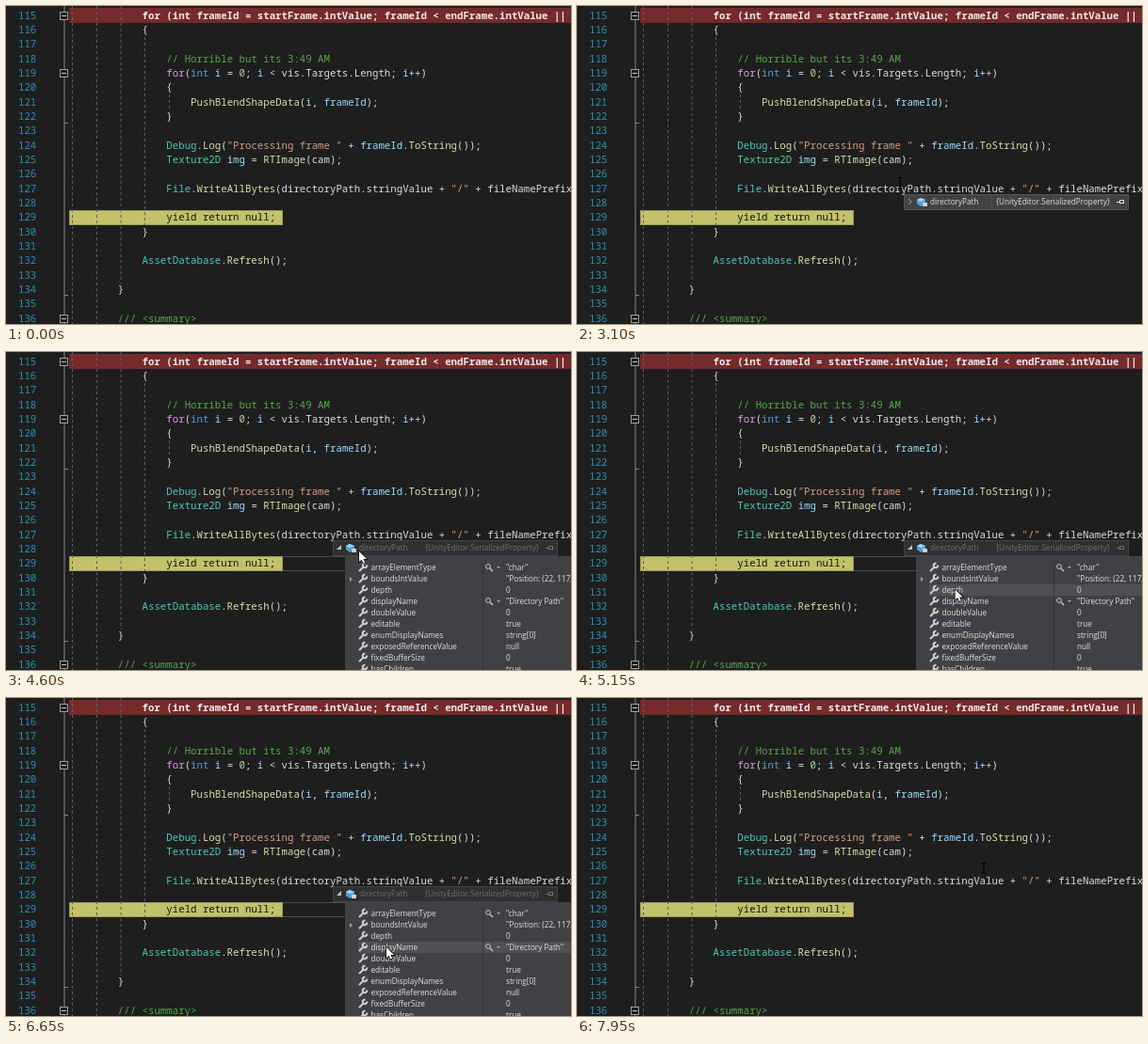
These frames come from a looping animation (600 px wide and 338 px high, 8000 ms). An HTML page with a canvas:

```html
<!DOCTYPE html>
<html lang="en">
<head>
<meta charset="utf-8">
<title>Debugger data tip</title>
<style>
html, body { margin: 0; width: 100%; height: 100%; overflow: hidden; background: #1e1e1e; }
canvas { display: block; width: 600px; height: 338px; }
</style>
</head>
<body>
<canvas id="stage" width="600" height="338"></canvas>
<script>
const ctx = document.getElementById('stage').getContext('2d');
const LOOP = 8000, PITCH = 15.33, FIRST = 115;
const CODE_FONT = '500 10.73px "Noto Sans Mono", monospace';
const BOLD_FONT = CODE_FONT.replace('500', '600');
const TIP_FONT = '8.2px "Open Sans", sans-serif';

// Each entry: line number, indent in columns, text
const code = [
  [115, 12, 'for (int frameId = startFrame.intValue; frameId < endFrame.intValue || '],
  [116, 12, '{'],
  [118, 16, '// Horrible but its 3:49 AM'],
  [119, 16, 'for(int i = 0; i < vis.Targets.Length; i++)'],
  [120, 16, '{'],
  [121, 20, 'PushBlendShapeData(i, frameId);'],
  [122, 16, '}'],
  [124, 16, 'Debug.Log("Processing frame " + frameId.ToString());'],
  [125, 16, 'Texture2D img = RTImage(cam);'],
  [127, 16, 'File.WriteAllBytes(directoryPath.stringValue + "/" + fileNamePrefix'],
  [129, 16, 'yield return null;'],
  [130, 12, '}'],
  [132, 12, 'AssetDatabase.Refresh();'],
  [134, 8, '}'],
  [136, 8, '/// <summary>']
];
const lineStyle = {
  115: { color: '#f2eaea', font: BOLD_FONT },
  129: { color: '#15150c', font: CODE_FONT }
};

const syntax = [
  [/^\/\/.*/, '#57a64a'],
  [/^"[^"]*"/, '#d69d85'],
  [/^for\b/, '#d8a0df'],
  [/^int\b/, '#569cd6'],
  [/^(Debug|Texture2D|File|AssetDatabase)\b/, '#4ec9b0'],
  [/^(frameId|img|i)\b/, '#9cdcfe'],
  [/^\w+(?=\()/, '#dcdcaa'],
  [/^\d+/, '#b5cea8'],
  [/^(\w+|\s+|.)/, '#dcdcdc']
];

// Each entry: property, value, has magnifier, can expand
const properties = [
  ['arrayElementType', '"char"', true],
  ['boundsIntValue', '"Position: (22, 117, 0)"', false, true],
  ['depth', '0'],
  ['displayName', '"Directory Path"', true],
  ['doubleValue', '0'],
  ['editable', 'true'],
  ['enumDisplayNames', 'string[0]'],
  ['exposedReferenceValue', 'null'],
  ['fixedBufferSize', '0'],
  ['hasChildren', 'true']
];

// Pointer path: time, x, y
const path = [
  [1100, 432, 350], [1500, 378, 240], [1850, 343, 188],
  [3100, 343, 188], [3500, 346, 198], [3850, 351, 207],
  [4400, 351, 207], [4600, 375, 212], [5200, 404, 256],
  [5250, 406, 258], [5550, 470, 352],
  [6350, 440, 350], [6650, 404, 265], [6900, 408, 258],
  [7200, 408, 258], [7500, 432, 181], [8000, 432, 181]
];

const ramp = (t, from, to) => Math.min(1, Math.max(0, (t - from) / (to - from)));
const rowY = line => 10 + (line - FIRST) * PITCH;
const columnX = col => 67.3 + col * 6.44;

function rect(x, y, w, h, color) {
  ctx.fillStyle = color;
  ctx.fillRect(x, y, w, h);
}

function stroke(points, color, width = 1) {
  ctx.strokeStyle = color;
  ctx.lineWidth = width;
  ctx.beginPath();
  points.forEach(([x, y]) => ctx.lineTo(x, y));
  ctx.stroke();
}

function shape(points, color) {
  ctx.fillStyle = color;
  ctx.beginPath();
  points.forEach(([x, y]) => ctx.lineTo(x, y));
  ctx.closePath();
  ctx.fill();
}

function text(str, x, y, color, font) {
  ctx.font = font;
  ctx.fillStyle = color;
  ctx.fillText(str, x, y);
}

function guide(x, top, bottom) {
  ctx.setLineDash([3, 3]);
  stroke([[x, top], [x, bottom]], '#5e5e5e');
  ctx.setLineDash([]);
}

function drawCodeLine(str, x, y, style) {
  if (style) return text(str, x, y, style.color, style.font);
  while (str) {
    const [rule, color] = syntax.find(([re]) => re.test(str));
    const token = str.match(rule)[0];
    text(token, x, y, color, CODE_FONT);
    x += ctx.measureText(token).width;
    str = str.slice(token.length);
  }
}

function drawEditor() {
  rect(0, 0, 600, 338, '#1e1e1e');
  rect(67, 2, 533, 16, '#752a2c');
  rect(67, 217, 227, 16, '#9a9958');
  rect(68, 218, 225, 14, '#c2c16c');

  guide(70.5, 0, 338);
  guide(96.5, 0, 338);
  guide(122, 0, 295);
  guide(147.5, 33, 233);
  guide(173.5, 94, 110);

  stroke([[62, 0], [62, 338]], '#858585');
  for (const y of [124.5, 307.5]) stroke([[62, y], [66, y]], '#858585');
  for (const line of [115, 119, 136]) {
    const y = Math.round(rowY(line)) + .5;
    rect(57, y - 4.5, 9, 9, '#1e1e1e');
    ctx.strokeStyle = '#a0a0a0';
    ctx.strokeRect(57.5, y - 4, 8, 8);
    stroke([[59, y], [64, y]], '#c8c8c8');
  }

  for (let line = FIRST; line <= 136; line++)
    text(line, 13, rowY(line) + 3.8, '#2b91af', CODE_FONT);
  for (const [line, col, str] of code)
    drawCodeLine(str, columnX(col), rowY(line) + 3.8, lineStyle[line]);
}

// Outline of the current line while the editor is out of focus
function drawLineOutline() {
  for (const y of [217.5, 232.5]) stroke([[294, y], [600, y]], '#4a4a4a');
}

function drawTip(expanded) {
  const ink = expanded ? '#707073' : '#e0e0e0';
  rect(347, 200, 239, 17, expanded ? '#434347' : '#55555a');
  rect(348, 201, 237, 15, expanded ? '#303033' : '#424245');
  if (expanded) shape([[356, 205], [356, 210], [351, 210]], '#c0c0c0');
  else stroke([[352, 205], [355, 208], [352, 211]], '#a0a0a0');

  shape([[361, 206], [365, 204], [370, 206], [370, 210], [365, 213], [361, 210]], '#4f9fd8');
  shape([[361, 206], [365, 204], [370, 206], [365, 208]], '#a5d5f5');
  rect(367, 209, 5, 4, '#d0d0d0');

  text('directoryPath', 375, 211, ink, TIP_FONT);
  text('{UnityEditor.SerializedProperty}', 445, 211, ink, TIP_FONT);
  if (!expanded) stroke([[440.5, 201], [440.5, 216]], '#505054');
  stroke([[573, 208.5], [576, 208.5]], ink);
  ctx.strokeRect(576.5, 206.5, 4, 3);
}

function drawWrench(x, y) {
  stroke([[x - 4, y + 4], [x + 1, y - 1]], '#d0d0d0', 2);
  ctx.beginPath();
  ctx.arc(x + 2, y - 2, 2.2, -.2, 4.9);
  ctx.stroke();
}

function drawMagnifier(x, y) {
  ctx.strokeStyle = '#c8c8c8';
  ctx.lineWidth = 1;
  ctx.beginPath();
  ctx.arc(x - 1, y - 1, 2.4, 0, 7);
  ctx.stroke();
  stroke([[x + 1, y + 1], [x + 4, y + 4]], '#c8c8c8', 1.5);
  shape([[x + 8, y - 1], [x + 12, y - 1], [x + 10, y + 1]], '#b0b0b0');
}

function drawProperties(pointer) {
  rect(360, 217, 240, 121, '#414145');
  properties.forEach(([name, value, magnifier, expands], i) => {
    const y = 229 + i * 12;
    if (pointer && pointer.x > 374 && Math.abs(pointer.y - y) < 6)
      rect(374, y - 6, 226, 12, '#505054');
    if (expands) shape([[365, y - 2], [368, y + .5], [365, y + 3]], '#a0a0a0');
    drawWrench(379, y);
    if (magnifier) drawMagnifier(513, y);
    text(name, 387.5, y + 3, '#e0e0e0', TIP_FONT);
    text(value, 531, y + 3, '#e0e0e0', TIP_FONT);
  });
  stroke([[506.5, 223], [506.5, 338]], '#343438');
}

function pointerAt(t) {
  const next = path.findIndex(([time]) => time > t);
  if (next < 1) return null;
  const [t0, x0, y0] = path[next - 1], [t1, x1, y1] = path[next];
  const k = ramp(t, t0, t1);
  return { x: x0 + (x1 - x0) * k, y: y0 + (y1 - y0) * k };
}

function drawPointer({ x, y }, isArrow) {
  ctx.save();
  ctx.translate(x, y);
  if (isArrow) {
    const arrow = [[0, 0], [0, 11], [2.6, 8.7], [4.4, 12.6], [6.2, 11.8], [4.5, 8], [8, 8], [0, 0]];
    stroke(arrow, '#000', 1.4);
    shape(arrow, '#fff');
  } else {
    stroke([[0, -5], [0, 5]], '#000', 1.2);
    stroke([[-2.5, -5.5], [2.5, -5.5]], '#000');
    stroke([[-2.5, 5.5], [2.5, 5.5]], '#000');
  }
  ctx.restore();
}

function faded(alpha, draw) {
  if (alpha <= 0) return;
  ctx.globalAlpha = alpha;
  draw();
  ctx.globalAlpha = 1;
}

function render(t) {
  const pointer = pointerAt(t);
  const opened = ramp(t, 4000, 4150) * (1 - ramp(t, 7300, 7450));
  drawEditor();
  faded(t < 2000 ? .4 * ramp(t, 1800, 1900) : 0,
    () => shape([[154, 191], [159, 194], [154, 197]], '#3c8a3c'));
  faded(opened, drawLineOutline);
  faded(ramp(t, 1950, 2050) * (1 - ramp(t, 7650, 7900)), () => drawTip(t > 4000));
  faded(opened, () => drawProperties(pointer));
  if (pointer) drawPointer(pointer, t > 3100 && pointer.y > 199);
}

function tick() {
  render(performance.now() % LOOP);
  requestAnimationFrame(tick);
}
tick();
</script>
</body>
</html>
```
